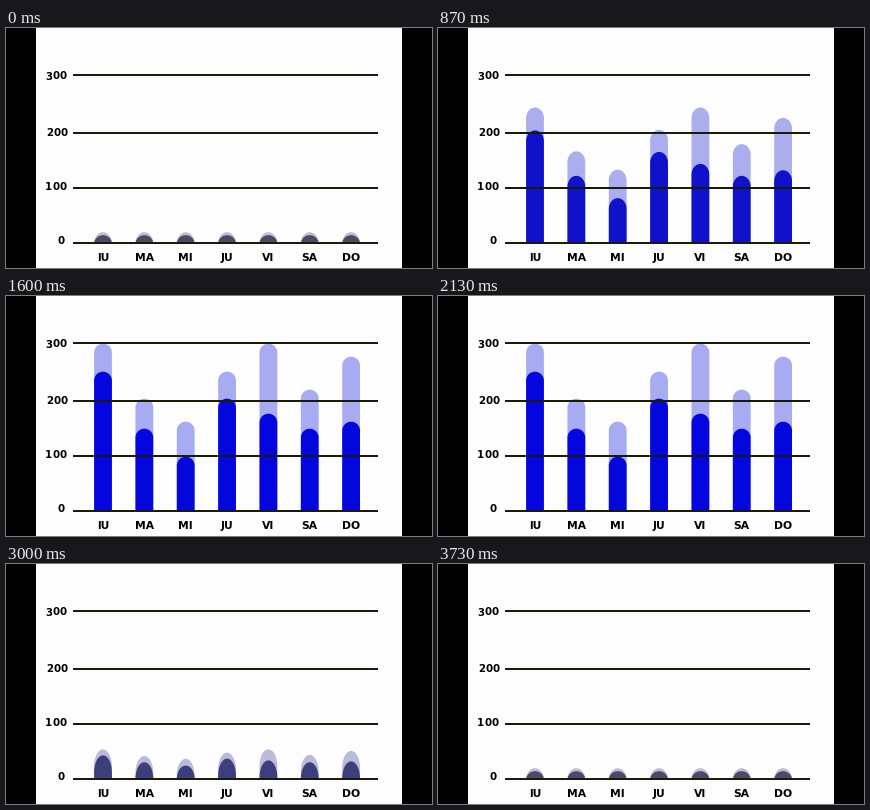
A matplotlib script that plays this animation: 426x240 px, repeating every 3790 ms.

```python
import matplotlib.pyplot as plt
import numpy as np
from matplotlib.animation import FuncAnimation
from matplotlib.patches import Polygon, Rectangle

W, H, DPI = 426, 240, 100
LOOP, TICK, FPS = 3790, 10, 15
BASE = 215.7
BAR_W = 17.8
DAYS = ["lU", "MA", "MI", "JU", "VI", "SA", "DO"]
LIGHT_H = [168, 113, 90, 140, 168, 122, 155]
DARK_H = [140, 83, 55, 113, 98, 83, 90]
# Each colour pair runs from the resting dome to the full bar.
LIGHT = np.array([[192, 189, 214], [167, 171, 242]]) / 255
DARK = np.array([[74, 75, 102], [4, 6, 222]]) / 255
LINE = (0.1, 0.1, 0.03)

fig = plt.figure(figsize=(W / DPI, H / DPI), dpi=DPI, facecolor="black")
ax = fig.add_axes([0, 0, 1, 1])
ax.set_xlim(0, W)
ax.set_ylim(H, 0)
ax.axis("off")


def box(x, y, w, h, color, z):
    ax.add_patch(Rectangle((x, y), w, h, color=color, lw=0, zorder=z))


def label(x, y, text, px):
    ax.text(x, y, text, fontsize=px * 72 / DPI, family="DejaVu Sans",
            weight="bold", color="black", ha="center", va="baseline",
            zorder=4)


def ease(x):
    x = min(max(x, 0), 1)
    return 4 * x**3 if x < 0.5 else 1 - 4 * (1 - x)**3


def growth(t):
    return ease((t - 0.3) / 0.9) - ease((t - 2.38) / 0.9)


def pill(cx, height, cap):
    a = np.linspace(0, np.pi, 41)
    x = cx + BAR_W / 2 * np.cos(a)
    y = BASE - height + cap * (1 - np.sin(a))
    foot = [(cx - BAR_W / 2, BASE), (cx + BAR_W / 2, BASE)]
    return np.vstack([np.column_stack([x, y]), foot])


box(30, 0, 366, H, (0.992, 0.992, 0.994), 0)

for y, x, base, text in [(46, 43, 51.3, "300"), (104, 44, 108, "200"),
                         (159, 42.5, 162, "100"), (214, 55.5, 216.3, "0")]:
    box(67, y, 304.5, 2, LINE, 3)
    for i, digit in enumerate(text):
        drop = 1.2 if digit == "3" else 0
        label(x + 7.2 * i, base + drop, digit, 10.2)

bars = []
for i, day in enumerate(DAYS):
    cx = 97 + 41.35 * i
    label(cx, 232.7, day, 10.7)
    for full, rest, colors, z in [(LIGHT_H[i], 11.5, LIGHT, 1),
                                  (DARK_H[i], 8.5, DARK, 2)]:
        patch = ax.add_patch(Polygon(pill(cx, rest, rest), lw=0, zorder=z))
        bars.append((patch, cx, full, rest, colors))


def draw(tick):
    step = int((tick * TICK + 5) * FPS / 1000)
    g = growth(step / FPS)
    tint = g**0.8
    for patch, cx, full, rest, colors in bars:
        height = rest + (full - rest) * g
        cap = min(height, 18) * (1 - g) + BAR_W / 2 * g
        patch.set_xy(pill(cx, height, cap))
        patch.set_facecolor(colors[0] * (1 - tint) + colors[1] * tint)
    return [bar[0] for bar in bars]


anim = FuncAnimation(fig, draw, frames=LOOP // TICK, interval=TICK,
                     repeat=True, repeat_delay=0, blit=False)
plt.show()
```
